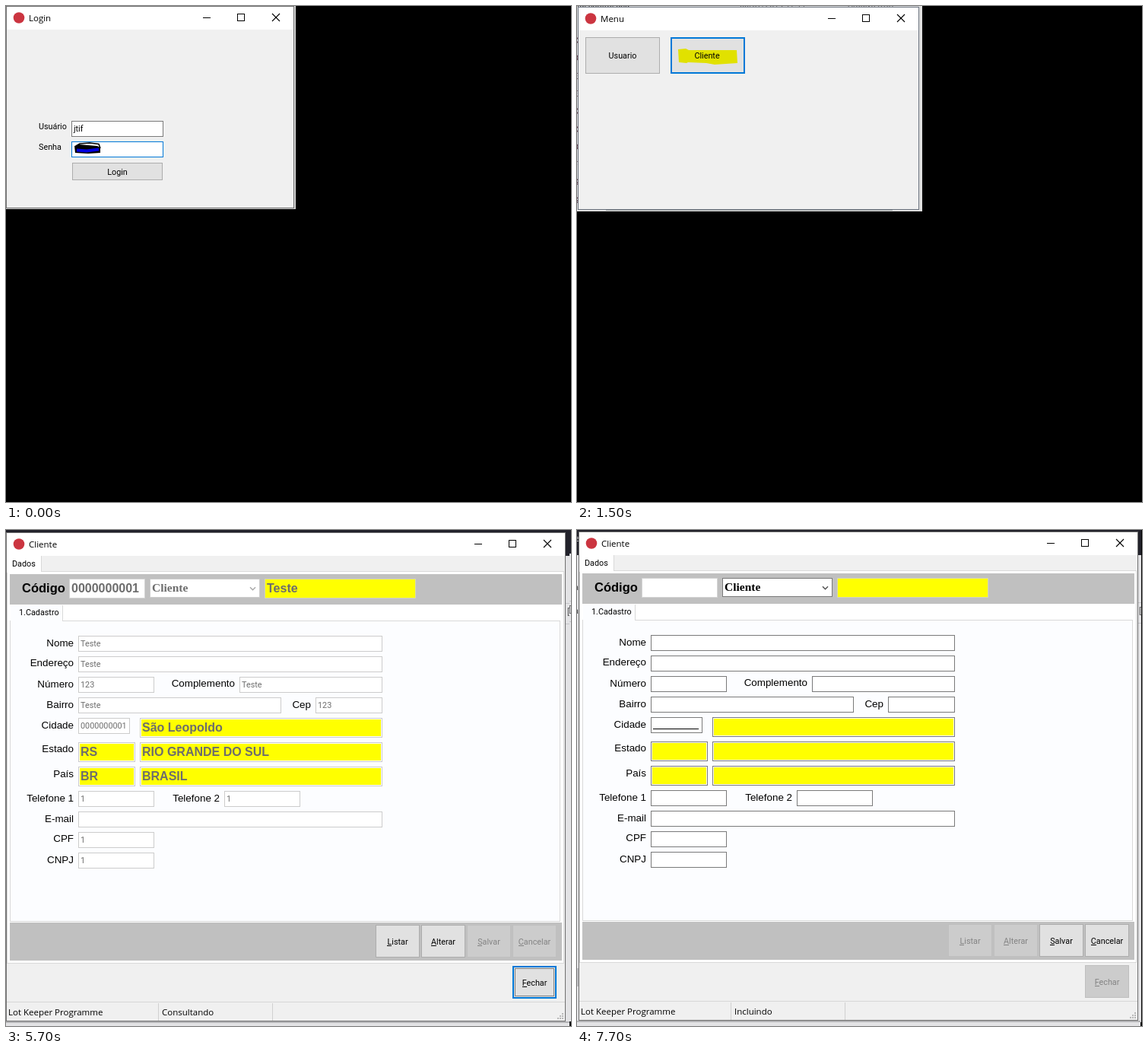
Animation of 743x652 px, one loop 8500 ms. Source, as an HTML page with a canvas:

```html
<!DOCTYPE html>
<html lang="pt-BR">
<head>
<meta charset="utf-8">
<title>Cadastro de clientes</title>
<style>
  html, body { margin: 0; width: 100%; height: 100%; overflow: hidden; background: #000; }
  canvas { display: block; }
</style>
</head>
<body>
<canvas id="stage" width="743" height="652"></canvas>
<script>
const ctx = document.getElementById('stage').getContext('2d');

const UI = '10.8px Roboto, sans-serif';
const TITLE = '11.5px "Open Sans", sans-serif';
const LABEL = '13.4px "Liberation Sans", sans-serif';
const BOLD = 'bold 16px "Liberation Sans", sans-serif';
const HEAD = 'bold 16.5px "Liberation Sans", sans-serif';
const SERIF = 'bold 15.5px "Liberation Serif", serif';

const BLUE = '#0078d7', FACE = '#f0f0f0', PANEL = '#c0c0c0';
const EDGE = '#7a7a7a', FAINT = '#cccccc', MUTED = '#6d6d6d', YELLOW = '#ffff00';
const MARK = '#e1e100', RED = '#cb3540';

function rect(x, y, w, h, color) {
  ctx.fillStyle = color;
  ctx.fillRect(x, y, w, h);
}

function box(x, y, w, h, fill, edge, line = 1) {
  rect(x, y, w, h, edge);
  rect(x + line, y + line, w - 2 * line, h - 2 * line, fill);
}

function text(str, x, y, font = UI, color = '#000', align = 'left') {
  ctx.font = font;
  ctx.fillStyle = color;
  ctx.textAlign = align;
  ctx.fillText(str, x, y);
}

function path(points, color, width = 1) {
  ctx.beginPath();
  points.forEach(([x, y]) => ctx.lineTo(x, y));
  ctx.strokeStyle = color;
  ctx.lineWidth = width;
  ctx.stroke();
}

function shape(points, color) {
  ctx.beginPath();
  points.forEach(([x, y]) => ctx.lineTo(x, y));
  ctx.fillStyle = color;
  ctx.fill();
}

function dotted(x, y, w, h) {
  ctx.setLineDash([1, 1]);
  ctx.lineWidth = 1;
  ctx.strokeStyle = '#222';
  ctx.strokeRect(x + .5, y + .5, w - 1, h - 1);
  ctx.setLineDash([]);
}

// dx, dy: direction the arrow points to
function chevron(x, y, dx, dy, size = 3.5, color = '#505050') {
  const wing = s => [x - dx * size / 2 + dy * size * s, y - dy * size / 2 + dx * size * s];
  path([wing(-1), [x + dx * size / 2, y + dy * size / 2], wing(1)], color, 1.4);
}

function caption(title, x, y, close) {
  ctx.beginPath();
  ctx.arc(x - 13, y, 7.3, 0, 7);
  ctx.fillStyle = RED;
  ctx.fill();
  text(title, x, y + 4.5, TITLE);
  rect(close - 96, y - .5, 10, 1, '#000');
  box(close - 51, y - 5.5, 10, 10, '#fff', '#000');
  path([[close - 5, y - 5.5], [close + 5, y + 4.5]], '#000', 1.1);
  path([[close + 5, y - 5.5], [close - 5, y + 4.5]], '#000', 1.1);
}

// state: 0 normal, 1 disabled, 2 focused
function button(str, x, y, w, h, state = 0, underline = true) {
  const off = state === 1;
  box(x, y, w, h, off ? '#cccccc' : '#e1e1e1', off ? '#bfbfbf' : state ? BLUE : '#adadad', state === 2 ? 2 : 1);
  buttonText(str, x + w / 2, y + h / 2 + 4, off ? '#838383' : '#000', underline);
}

function buttonText(str, cx, y, color, underline) {
  text(str, cx, y, UI, color, 'center');
  if (!underline) return;
  const left = cx - ctx.measureText(str).width / 2;
  rect(Math.round(left), Math.round(y) + 1, Math.round(ctx.measureText(str[0]).width), 1, color);
}

function at(x, y, draw) {
  ctx.save();
  ctx.translate(x, y);
  draw();
  ctx.restore();
}

function login() {
  rect(0, 0, 381, 267, '#d2d2d2');
  box(0, 0, 379, 266, FACE, '#6f6f6f');
  rect(1, 1, 377, 30, '#fff');
  caption('Login', 30, 15.5, 355);
  text('Usuário', 43, 162);
  text('Senha', 43, 189);
  box(86, 151, 121, 21, '#fff', EDGE);
  text('jtif', 89, 165);
  box(86, 178, 121, 21, '#fff', BLUE);
  shape([[90, 184], [96, 182], [120, 184], [124, 186], [124, 193], [108, 194], [91, 193]], '#000');
  path([[93, 189.5], [106, 190.5], [122, 188.5]], '#0000e0', 4);
  path([[92, 184], [97, 181], [110, 180], [122, 181.5], [124, 187]], '#000', 1.6);
  button('Login', 87, 206, 119, 23, 0, false);
}

function menu() {
  rect(0, 0, 454, 270, '#dedede');
  text('tal control.dcu', 0, 2, UI, '#333');
  text('00/07/2019 17:11', 214, 2, UI, '#777');
  text('Arquivo DCU', 356, 2, UI, '#777');
  [...'CDEECCDFGG'].forEach((c, i) => text(c, -5, 49 + i * 23.3, UI, '#502030'));
  box(1, 1, 449, 267, FACE, '#6c7480');
  rect(2, 2, 447, 30, '#fff');
  rect(38, 268, 377, 1, '#a0a5a5');
  caption('Menu', 31, 16.5, 426);
  button('Usuario', 11, 41, 98, 48, 0, false);
  button('', 123, 41, 98, 48, 2, false);
  shape([[133, 57], [143, 56], [147, 58], [210, 58], [211, 75], [181, 77], [170, 75], [146, 74], [144, 75], [134, 74]], MARK);
  buttonText('Cliente', 171, 69, '#000', false);
}

function backdrop(w, h, top) {
  rect(0, 0, w, h, '#e3e3e5');
  rect(0, 0, w, top, '#22222b');
  rect(w - 5, top + 62, 5, 1, '#c4c4c8');
  rect(w - 5, top + 89, 5, 1, '#c4c4c8');
  text('[', w - 3, top + 77, UI, '#444');
  text('e', -3, 15, TITLE, '#ddd');
  text('a', -4, 79, UI, '#333');
  text('a', -4, 110, UI, '#333');
  rect(0, 576, 3, 24, '#bcbcc0');
}

function shell(tab, tabWidth, status) {
  box(2, 0, 736, 643, FACE, '#707070');
  rect(3, 1, 734, 30, '#fff');
  caption('Cliente', 32, 15.5, 714);
  rect(3, 51, 733, 516, '#d9d9d9');
  rect(4, 52, 731, 514, '#fff');
  rect(3, 31, tabWidth + 1, 21, '#d9d9d9');
  rect(3, 31, tabWidth, 22, '#fff');
  text(tab, 10, 45);
  rect(7, 55, 726, 40, PANEL);
  rect(7, 513, 726, 50, PANEL);
  rect(3, 617, 734, 1, '#d7d7d7');
  rect(202, 619, 1, 23, '#d0d0d0');
  rect(352, 619, 1, 23, '#d0d0d0');
  text('Lot Keeper Programme', 5, 635, TITLE);
  text(status, 207, 635, TITLE);
  for (let i = 0; i < 3; i++)
    for (let j = 0; j <= i; j++) rect(733 - j * 3, 632 + i * 3, 2, 2, '#b8b8b8');
}

function grid() {
  box(10, 98, 720, 412, '#fff', '#a5a9b0');
  const shade = ctx.createLinearGradient(0, 100, 0, 118);
  shade.addColorStop(0, '#fafafa');
  shade.addColorStop(1, '#e6e6e6');
  rect(12, 100, 700, 18, shade);
  rect(12, 117, 700, 1, '#cfcfcf');
  rect(12, 118, 12, 36, '#ededed');
  const heads = ['Código', 'Tipo', 'Nome', 'Cidade', 'TELEFONE1', 'TELEFONE2', 'EMAIL'];
  const cols = [24, 89, 114, 215, 280, 345, 410];
  cols.forEach((x, i) => {
    rect(x - 1, 101, 1, 17, '#c4c4c4');
    rect(x - 1, 118, 1, 36, '#e2e2e2');
    text(heads[i], x + 1, 113);
  });
  const rows = [['0000000001', 'Teste', ''], ['0000000002', 'TESTE 01', 'TESTE']];
  rows.forEach(([code, name, mail], i) => {
    const y = 131 + i * 18;
    rect(12, y + 4, 700, 1, '#e6e6e6');
    text(code, 26, y);
    text('CL', 91, y);
    text(name, 116, y);
    text('0000000001', 217, y);
    text('1', 341, y, UI, '#000', 'right');
    text('1', 406, y, UI, '#000', 'right');
    text(mail, 412, y);
  });
  rect(12, 135, 12, 1, '#bbb');
  rect(12, 153, 12, 1, '#bbb');
  shape([[15, 121], [21, 127], [15, 133]], '#000');

  rect(712, 100, 16, 408, FACE);
  rect(12, 491, 716, 17, FACE);
  rect(712, 118, 15, 237, '#cdcdcd');
  rect(29, 492, 17, 15, '#cdcdcd');
  chevron(719.5, 109, 0, -1);
  chevron(719.5, 483, 0, 1);
  chevron(19.5, 499.5, -1, 0);
  chevron(703, 499.5, 1, 0);
}

function search() {
  backdrop(743, 646, 31);
  shell('Pesquisa', 58, 'Consultando');
  text('Pesquisar por', 15, 79, HEAD);
  box(131, 63, 100, 26, '#fff', EDGE);
  text('Código', 134, 82, BOLD);
  chevron(222, 77, 0, 1);
  text('Conteúdo', 245, 79, HEAD);
  box(329, 63, 119, 26, '#fff', EDGE);
  rect(332, 83, 91, 1, '#000');
  button('', 628, 64, 98, 28, 2, false);
  shape([[631, 70], [650, 71], [672, 69], [690, 66], [723, 67], [724, 89], [680, 90], [631, 89]], MARK);
  shape([[690, 66], [698, 64], [716, 64], [722, 67]], '#8a9a20');
  dotted(631, 67, 92, 22);
  buttonText('Pesquisar', 676, 83, '#000', true);
  grid();
  button('Incluir', 549, 516, 58, 43);
  button('Detalhar', 609, 516, 58, 43);
  button('Excluir', 668, 516, 58, 43);
  button('Fechar', 668, 570, 58, 43);
}

// label, baseline, then fields: x, y, width, value, yellow
const FORM = [
  ['Nome', 152, [97, 138, 400, 'Teste']],
  ['Endereço', 178, [97, 165, 400, 'Teste']],
  ['Número', 206, [97, 192, 100, '123'], [309, 192, 188, 'Teste']],
  ['Bairro', 233, [97, 219, 267, 'Teste'], [409, 219, 88, '123']],
  ['Cidade', 260, [97, 246, 68, '0000000001'], [178, 246, 319, 'São Leopoldo', 1]],
  ['Estado', 291, [97, 278, 75, 'RS', 1], [178, 278, 319, 'RIO GRANDE DO SUL', 1]],
  ['País', 324, [97, 310, 75, 'BR', 1], [178, 310, 319, 'BRASIL', 1]],
  ['Telefone 1', 356, [97, 342, 100, '1'], [289, 342, 100, '1']],
  ['E-mail', 383, [97, 369, 400, '']],
  ['CPF', 409, [97, 396, 100, '1']],
  ['CNPJ', 437, [97, 423, 100, '1']]
];

function form(filled) {
  const edge = filled ? FAINT : EDGE;
  text('Código', 23, 81, HEAD);
  box(85, 63, 100, 26, '#fff', '#d4d4d4');
  box(191, 63, 145, 25, '#fff', edge);
  text('Cliente', 194, 80, SERIF, filled ? MUTED : '#000');
  chevron(326.5, 76, 0, 1, 3.5, filled ? '#a8a8a8' : '#505050');
  box(342, 63, 199, 26, YELLOW, '#d8d8b0');

  rect(7, 97, 726, 418, '#fff');
  box(7, 118, 724, 396, '#fcfdff', '#d9d9d9');
  rect(76, 98, 1, 21, '#d9d9d9');
  rect(8, 98, 68, 22, '#fcfdff');
  text('1.Cadastro', 19, 111);

  FORM.forEach(([label, base, ...fields]) => {
    text(label, 91, base, LABEL, '#000', 'right');
    fields.forEach(([x, y, w, value, yellow]) => {
      box(x, y, w, yellow ? 26 : 21, '#fff', edge);
      if (yellow) rect(x + 2, y + 2, w - 4, 22, YELLOW);
      if (!filled) return;
      if (yellow) text(value, x + 3, y + 18, BOLD, MUTED);
      else text(value, x + 3, y + 14, UI, MUTED);
    });
  });
  text('Complemento', 303, 205, LABEL, '#000', 'right');
  text('Cep', 403, 233, LABEL, '#000', 'right');
  text('Telefone 2', 283, 356, LABEL, '#000', 'right');

  if (filled) {
    text('0000000001', 88, 81, BOLD, MUTED);
    text('Teste', 345, 81, BOLD, MUTED);
  } else {
    rect(100, 261, 60, 1, '#000');
  }
  ['Listar', 'Alterar', 'Salvar', 'Cancelar'].forEach((name, i) =>
    button(name, 488 + i * 60, 518, 58, 43, (i < 2) === filled ? 0 : 1));
  button('Fechar', 668, 572, 58, 43, filled ? 2 : 1);
  if (filled) dotted(671, 575, 52, 37);
}

function clientWindow(x, y, filled) {
  at(x, y, () => shell('Dados', 45, filled ? 'Consultando' : 'Incluindo'));
  at(x, y - 2, () => form(filled));
}

function details() {
  backdrop(743, 646, 31);
  backdrop(741, 652, 34);
  rect(0, 646, 741, 2, '#b4b4b6');
  clientWindow(-2, 3, true);
}

function entry() {
  backdrop(741, 652, 34);
  backdrop(742, 647, 33);
  rect(0, 645, 741, 2, '#b4b4b6');
  clientWindow(0, 2, false);
}

const SCENES = [[0, login], [1500, menu], [3000, search], [4500, details], [6500, entry]];
const LOOP = 8500;
const start = performance.now();
let shown = null;

function tick() {
  const t = (performance.now() - start) % LOOP;
  const scene = SCENES.filter(([from]) => from <= t).pop()[1];
  if (scene !== shown) {
    shown = scene;
    rect(0, 0, 743, 652, '#000');
    scene();
  }
  requestAnimationFrame(tick);
}
tick();
</script>
</body>
</html>
```
